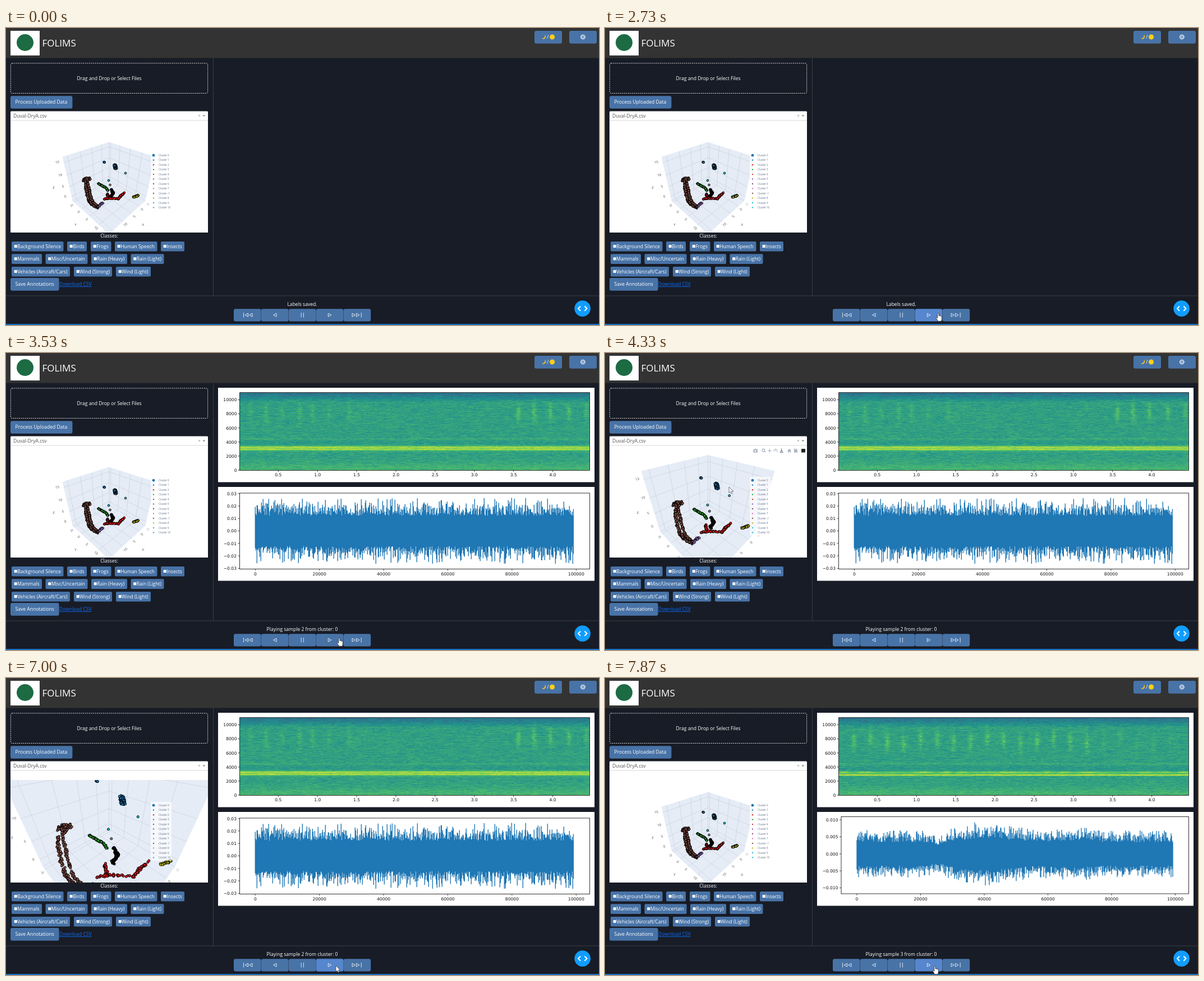
An HTML page with a canvas that plays this animation: 1057x530 px, repeating every 8 s.

```html
<!DOCTYPE html>
<html lang="en">
<head>
<meta charset="utf-8">
<title>Audio annotation dashboard</title>
<style>
  html, body { margin: 0; width: 100%; height: 100%; overflow: hidden; background: #181c26; }
  #stage { position: absolute; left: 0; top: 0; width: 1057px; height: 530px; overflow: hidden; }
  #stage > * { position: absolute; left: 0; top: 0; }
  svg { font: 8.55px "Open Sans", sans-serif; fill: #fff; }
  #scene { left: 8px; top: 166px; }
  .spec { left: 417px !important; top: 71px !important; }
  .tick { font: 7.6px "DejaVu Sans", sans-serif; fill: #111; }
  .legend { font-size: 4.5px; fill: #5f6e88; }
</style>
</head>
<body>
<div id="stage">
  <svg id="base" width="1057" height="530"></svg>
  <canvas id="scene" width="352" height="199"></canvas>
  <canvas class="spec" id="spec2" width="623" height="138"></canvas>
  <canvas class="spec" id="spec3" width="623" height="138"></canvas>
  <svg id="top" width="1057" height="530"></svg>
</div>
<script>
const $ = id => document.getElementById(id);
const BLUE = '#4873a7', HOVER = '#5686cd';

function seeded(s) {
  return () => {
    s = (s + 0x6D2B79F5) | 0;
    let v = Math.imul(s ^ (s >>> 15), 1 | s);
    v = (v + Math.imul(v ^ (v >>> 7), 61 | v)) ^ v;
    return ((v ^ (v >>> 14)) >>> 0) / 4294967296;
  };
}
const smooth = u => u * u * (3 - 2 * u);
const bump = (x, c, w) => Math.exp(-(((x - c) / w) ** 2));

/* ---- markup helpers ---- */
const rect = (x, y, w, h, fill, more = '') =>
  `<rect x="${x}" y="${y}" width="${w}" height="${h}" fill="${fill}" ${more}/>`;
const text = (x, y, s, more = '') => `<text x="${x}" y="${y}" ${more}>${s}</text>`;
const mid = 'text-anchor="middle"';
const line = (d, color = '#fff', w = 0.8) =>
  `<path d="${d}" fill="none" stroke="${color}" stroke-width="${w}"/>`;
const disc = (x, y, r, fill) => `<circle cx="${x}" cy="${y}" r="${r}" fill="${fill}"/>`;
const button = (x, y, w, h, more = '') => rect(x, y, w, h, BLUE, `rx="3" ${more}`);
const left = x => `M${x + 5.5} 509.2V515.2L${x} 512.2Z`;
const right = x => `M${x} 509.2V515.2L${x + 5.5} 512.2Z`;
const bar = x => `M${x} 508V516.5`;

function classRow(y, items) {
  return items.map(([x, w, label]) =>
    rect(x, y, w, 17.6, BLUE, 'rx="2"') + rect(x + 4.7, y + 6, 5, 5, '#fff') +
    text(x + 10.2, y + 11.8, label)).join('');
}

/* ---- right hand plots ---- */
const plots = {
  2: { x0: 444.3, dx: 114.4, y0: 317.5, dy: 22.25, unit: 0.01, count: 3, digits: 2, box: [416.5, 250, 624, 135.5] },
  3: { x0: 449, dx: 113.5, y0: 313.8, dy: 30.35, unit: 0.005, count: 2, digits: 3, box: [421, 247.5, 619.5, 137.5] }
};

function wave(n, p) {
  const rnd = seeded(n * 31), end = p.x0 + p.dx * 4.965;
  const amp = env => {
    const r = rnd();
    return n == 2 ? 27 + 19 * r + 13 * r ** 7 : (23 + 17 * r + 7 * r ** 6) * env;
  };
  let d = '';
  for (let x = p.x0; x < end; x += 1) {
    const env = 0.9 + 0.34 * bump(x, 680, 55) + 0.13 * bump(x, 830, 45) - 0.25 * bump(x, 593, 14);
    d += `M${x.toFixed(1)} ${(p.y0 - amp(env)).toFixed(1)}V${(p.y0 + amp(env)).toFixed(1)}`;
  }
  return line(d, '#1f77b4', 1.35);
}

function plotMarkup(n) {
  const p = plots[n], [bx, by, bw, bh] = p.box;
  let s = rect(378, 62, 671, 168.5, '#fff') + rect(378, 239, 671, 167.5, '#fff');
  s += rect(416.6, 70.6, 623.8, 138.8, 'none', 'stroke="#000" stroke-width=".8"');
  for (let i = 0; i < 6; i++) {
    const y = 209 - i * 25.1;
    s += line(`M413.5 ${y}H417`, '#000', 0.7) + text(411.5, y + 2.8, i * 2000, 'class="tick" text-anchor="end"');
    const x = p.x0 + i * p.dx;
    s += line(`M${x} ${by + bh}v3`, '#000', 0.7) + text(x, 396.8, i * 20000, `class="tick" ${mid}`);
  }
  for (let i = 1; i < 9; i++) {
    const x = 415.4 + i * 69.9;
    s += line(`M${x} 209v3.5`, '#000', 0.7) + text(x, 220.2, (i / 2).toFixed(1), `class="tick" ${mid}`);
  }
  s += wave(n, p) + rect(bx, by, bw, bh, 'none', 'stroke="#000" stroke-width=".8"');
  for (let i = -p.count; i <= p.count; i++) {
    const y = p.y0 - i * p.dy, v = (i * p.unit).toFixed(p.digits).replace('-', '−');
    s += line(`M${bx - 3} ${y}h3`, '#000', 0.7) + text(bx - 5.5, y + 2.8, v, 'class="tick" text-anchor="end"');
  }
  return `<g id="plot${n}">${s}</g>`;
}

const viridis = [[68, 1, 84], [59, 82, 139], [33, 145, 140], [94, 201, 98], [253, 231, 37]];
function shade(v) {
  v = Math.max(0, Math.min(0.999, v)) * 4;
  const i = v | 0, u = v - i;
  return viridis[i].map((c, k) => c + (viridis[i + 1][k] - c) * u);
}

function drawSpectrogram(n) {
  const W = 623, H = 138, ctx = $('spec' + n).getContext('2d');
  const img = ctx.createImageData(W, H), rnd = seeded(n * 977);
  const calls = n == 2
    ? [[913, .16], [941, .16], [970, .16], [1003, .13], [1034, .12], [435, .07], [463, .08], [492, .07],
       [523, .1], [545, .08], [575, .05], [612, .05], [641, .04]]
    : Array.from({ length: 20 }, (_, i) => [443 + i * 29.7, i < 15 ? 0.15 : 0.06]);
  for (let y = 0; y < H; y++) {
    const hz = (H - y - 0.5) / H * 11000;
    const base = 0.565 + 0.09 * bump(hz, 0, 1000) - 0.2 * Math.max(0, (hz - 9600) / 1400)
      - 0.03 * bump(hz, 3800, 350) + 0.05 * bump(hz, 4450, 120);
    let noise = 0;
    for (let x = 0; x < W; x++) {
      if (x % 4 == 0) noise = noise * 0.35 + (rnd() + rnd() - 1) * 0.075;
      let v = base + noise;
      if (n == 2) {
        v += 0.22 * bump(hz, 3110, 330) + 0.15 * (bump(hz, 3290, 110) + bump(hz, 2930, 110));
      } else {
        const dash = 0.75 + 0.25 * Math.sin(x / 9 + 3 * Math.sin(x / 31));
        v += 0.27 * dash * bump(hz, 3250, 120) + 0.33 * bump(hz, 2850, 110) + 0.1 * bump(hz, 3050, 200);
      }
      for (const [cx, a] of calls) {
        const dx = x + 417 - cx;
        if (Math.abs(dx) < 14)
          v += a * bump(dx, 0, 4) * bump(hz, n == 2 ? 8200 : 7700 + 500 * Math.sin(cx), 1250) * (0.8 + 5 * noise);
      }
      const o = (y * W + x) * 4, c = shade(v);
      img.data[o] = c[0]; img.data[o + 1] = c[1]; img.data[o + 2] = c[2]; img.data[o + 3] = 255;
    }
  }
  ctx.putImageData(img, 0, 0);
}

/* ---- 3D scatter: camera at distance d along (1,1,1) ---- */
const FAR = 2.165, NEAR = 1.07, CX = 183.5, CY = 274, FOCAL = 222, HZ = 0.46;
const project = (x, y, z, d) => {
  const k = FOCAL / (d - (x + y + z) / Math.sqrt(3));
  return [CX + (y - x) / Math.SQRT2 * k, CY - (2 * z - x - y) / Math.sqrt(6) * k];
};

// colour, count, spread x, spread y, depth, path of far-view positions
const clusters = [
  ['#17becf', 1, 0, 0, -0.38, [[213, 259]]],
  ['#2ca02c', 60, 0.6, 0.6, -0.2, [[164, 277], [172, 282], [178, 285], [181.5, 290]]],
  ['#17becf', 1, 0, 0, 0, [[183, 272]]],
  ['#050505', 90, 1.2, 1, 0.02, [[187.5, 288], [191, 294.5], [186.5, 301.5]]],
  ['#7f7f7f', 1, 0, 0, 0.1, [[185.5, 280]]],
  ['#1f77b4', 90, 1.6, 2.4, 0.086, [[194, 245.5], [195.8, 249]]],
  ['#bcbd22', 30, 0.9, 0.7, 0.086, [[227, 302], [231, 300.5], [235.5, 299]]],
  ['#8c564b', 95, 1.5, 1.8, -0.03, [[138, 272], [143, 269], [149, 269], [142, 275]]],
  ['#8c564b', 120, 1.4, 1, 0.16, [[141.5, 277], [144, 294], [148, 308], [152, 314], [163, 321]]],
  ['#8c564b', 90, 1, 1, 0.16, [[146, 277], [149.5, 295], [155, 311], [165, 320]]],
  ['#9467bd', 14, 1.2, 1.2, 0.3, [[165, 318], [172, 312]]],
  ['#e8171c', 35, 0.9, 0.9, 0.39, [[180.5, 296.5], [182.5, 304]]],
  ['#e8171c', 85, 0.8, 0.8, 0.39, [[175, 305.5], [184, 303.5], [200, 305], [204, 300], [210.5, 294.5]]],
  ['#1f77b4', 7, 0.3, 0.3, 0.39, [[173.8, 238.4], [176.4, 240.4]]]
];
const rnd = seeded(42), spread = s => (rnd() + rnd() - 1) * 1.35 * s;
const points = clusters.flatMap(([color, n, sx, sy, depth, path]) =>
  Array.from({ length: n }, () => {
    const u = rnd() * (path.length - 1), i = Math.min(u | 0, Math.max(0, path.length - 2));
    const a = path[i], b = path[i + 1] || a;
    return { color, depth, x: a[0] + (b[0] - a[0]) * (u - i) + spread(sx), y: a[1] + (b[1] - a[1]) * (u - i) + spread(sy) };
  }));

const scene = $('scene').getContext('2d');
function drawScene(d) {
  const c = scene, at = (x, y, z) => project(x, y, z, d);
  const trace = (...p) => { c.beginPath(); p.forEach(q => c.lineTo(...q)); };
  const label = (s, [x, y], dx, dy, turn) => {
    c.save(); c.translate(x + dx, y + dy); c.rotate(turn); c.fillText(s, 0, 0); c.restore();
  };
  c.setTransform(1, 0, 0, 1, 0, 0);
  c.fillStyle = '#fff'; c.fillRect(0, 0, 352, 199);
  c.translate(-8, -166);
  c.save();
  c.beginPath(); c.rect(8, 182, 352, 183); c.clip();
  const A = at(-.5, -.5, HZ), B = at(-.5, -.5, -HZ), L = at(.5, -.5, HZ), l = at(.5, -.5, -HZ);
  const R = at(-.5, .5, HZ), r = at(-.5, .5, -HZ), F = at(.5, .5, -HZ);
  c.fillStyle = c.strokeStyle = '#e5ecf6'; c.lineWidth = 0.5;
  for (const face of [[A, L, l, B], [A, R, r, B], [B, l, F, r]]) { trace(...face); c.closePath(); c.fill(); c.stroke(); }
  c.strokeStyle = '#c3cbd7'; c.lineWidth = 0.6;
  const ticks = [0, 1, 2, 3];
  for (const i of ticks) {
    const x = -0.3 + i * 0.24, y = -0.45 + i * 0.24, z = -0.353 + i * 0.24;
    trace(at(x, -.5, HZ), at(x, -.5, -HZ), at(x, .5, -HZ)); c.stroke();
    trace(at(-.5, y, HZ), at(-.5, y, -HZ), at(.5, y, -HZ)); c.stroke();
    trace(at(.5, -.5, z), at(-.5, -.5, z), at(-.5, .5, z)); c.stroke();
  }
  trace(A, B, l); c.stroke(); trace(B, r); c.stroke();
  c.fillStyle = '#444'; c.font = '6px "Open Sans", sans-serif';
  c.textAlign = 'center'; c.textBaseline = 'middle';
  for (const i of ticks) {
    label(i * 5, at(.5, -.5, -0.353 + i * 0.24), -11.5, 0, -0.25);
    label(i * 5 - 5, at(.5, -0.45 + i * 0.24, -HZ), -5, 6, 0.75);
    if (i < 3) label(i * 5, at(-0.3 + i * 0.24, .5, -HZ), 5, 6, -0.75);
  }
  c.fillStyle = '#999'; label(-5, at(-.5, .5, -HZ), 5, 7, -0.75); c.fillStyle = '#444';
  label('Z', at(.5, -.5, 0), -26, 11, 0);
  label('Y', at(.5, 0, -HZ), -23, 17, 0);
  label('X', at(0, .5, -HZ), 24, 17, 0);
  c.strokeStyle = '#000'; c.lineWidth = 0.9;
  const size = 1.85 + 0.25 * (FAR - d) / (FAR - NEAR);
  for (const p of points) {
    const k = (FAR - p.depth) / (d - p.depth);
    c.beginPath();
    c.arc(CX + (p.x - CX) * k, CY + (p.y - CY) * k, size, 0, 7);
    c.fillStyle = p.color; c.fill(); c.stroke();
  }
  c.restore();
}

/* ---- static page ---- */
$('base').innerHTML =
  rect(0, 0, 1057, 530, '#181c26') + rect(0, 0, 1057, 53.5, '#333') +
  rect(8, 5, 52, 44, '#fff') + disc(34, 26, 15, '#1d6b43') +
  text(64.5, 33, 'FOLIMS', 'font-size="17"') +
  button(942, 5, 49, 22.7) + button(1004, 5, 49, 22.7) +
  '<path d="M960.6 11.6A4.6 4.6 0 1 1 954.6 18.6A5.4 5.4 0 0 0 960.6 11.6Z" fill="#fcc21b"/>' +
  text(964.3, 19.2, '/') + disc(973.6, 16, 4.5, '#fdd017') +
  '<circle cx="1028.3" cy="16" r="3.8" fill="none" stroke="#fff" stroke-width="1.3" stroke-dasharray="1.5 .89"/>' +
  '<circle cx="1028.3" cy="16" r="2.9" fill="none" stroke="#fff" stroke-width=".9"/>' + disc(1028.3, 16, 1, '#fff') +
  rect(369, 53.5, 0.8, 424, '#41454c') + rect(0, 477.5, 1057, 0.8, '#41454c') +
  rect(8.4, 62.9, 351.2, 53.6, 'none', 'rx="2.5" stroke="#fff" stroke-width=".8" stroke-dasharray="2.2 1.4"') +
  text(184, 93.4, 'Drag and Drop or Select Files', mid) +
  button(8, 121.3, 110.4, 22.5) + text(16.5, 135.3, 'Process Uploaded Data') +
  rect(8, 148.6, 352, 216.4, '#fff', 'rx="1.5"') + rect(8, 164.6, 352, 0.8, '#ccc') +
  text(13, 159.8, 'Duval-DryA.csv', 'fill="#555"') + text(344.5, 159.3, '×', `${mid} fill="#888" font-size="8"`) +
  '<path d="M350.3 155.5H355.3L352.8 158.2Z" fill="#888"/>' +
  text(184, 374.2, 'Classes:', mid) +
  classRow(381, [[10, 92.5, 'Background Silence'], [109, 35, 'Birds'], [151, 36.5, 'Frogs'], [194, 75.5, 'Human Speech'], [276, 42, 'Insects']]) +
  classRow(403.3, [[10, 54, 'Mammals'], [70.5, 75, 'Misc/Uncertain'], [152, 64, 'Rain (Heavy)'], [222.5, 59, 'Rain (Light)']]) +
  classRow(426, [[10, 104, 'Vehicles (Aircraft/Cars)'], [121, 68, 'Wind (Strong)'], [196, 62, 'Wind (Light)']]) +
  button(8, 446, 86.5, 22.7) + text(16.5, 460.2, 'Save Annotations') +
  text(94.8, 460.2, 'Download CSV', 'fill="#0d6efd" text-decoration="underline"') +
  plotMarkup(2) + plotMarkup(3) +
  text(528, 496.4, '', `${mid} id="status"`) +
  [406, 455, 504, 552.8, 601.6].map((x, i) => button(x, 501.2, 48.6, 22.4, i == 3 ? 'id="play"' : '')).join('') +
  line(bar(423.5) + left(426) + left(433.5) + left(476.5) + bar(526.2) + bar(530.4) + right(574.3) +
    right(617) + right(624.5) + bar(633.2)) +
  rect(0, 528, 1057, 2, '#1670c4');

const legend = [['0', '#1f77b4'], ['1', '#1f77b4'], ['2', '#e8171c'], ['3', '#2ca02c'], ['4', '#d62728'], ['5', '#9467bd'],
  ['6', '#8c4a6b'], ['7', '#e377c2'], ['-1', '#8c564b'], ['8', '#bcbd22'], ['9', '#17becf'], ['10', '#17becf']];
$('top').innerHTML =
  rect(258, 221, 37, 105, '#fff', 'fill-opacity=".65"') +
  legend.map(([n, color], i) =>
    disc(263, 227.2 + i * 8.47, i ? 1.2 : 2.4, color) +
    text(272, 228.8 + i * 8.47, 'Cluster ' + n, 'class="legend"')).join('') +
  '<g id="tools" stroke-linejoin="round">' +
    '<path d="M264.5 172H266.5L267.3 170.8H269.3L270 172H272V177.5H264.5ZM337 172.5H343V177.5H337ZM336 171H342V172H336Z" fill="#a9b2c0"/>' +
    disc(268.2, 174.5, 1.5, '#fff') +
    line('M284.6 175.4L286.4 177.4M280 173.6a2.5 2.5 0 1 0 5 0a2.5 2.5 0 1 0 -5 0', '#a9b2c0', 1.2) +
    line('M290 174.3H297M293.5 170.8V177.8M301.5 176a3 3 0 1 1 4 1M305 171.5L303 175', '#a9b2c0', 1) +
    line('M314.5 170.5V176M311.5 177.5H317.8M312.5 176L314.5 174.5L316.7 176', '#69738a', 1.1) +
    '<path d="M325 174.5L328.5 171L332 174.5H331V177.8H329.3V175.5H327.7V177.8H326V174.5Z" fill="#a9b2c0"/>' +
    rect(350, 171, 7, 6.5, '#222') +
  '</g>' +
  '<g id="loading">' + rect(0, 0, 1057, 528, '#181c26') + rect(0, 0, 1057, 0.9, '#383c43') +
    [0, 1, 2, 3, 4].map(i => rect(517.2 + i * 4.3, 262, 3, 18, '#119dff', 'class="bar"')).join('') + '</g>' +
  disc(1027.6, 500.6, 14.3, '#119dff') +
  line('M1024 496.5L1020 500.6L1024 504.7M1031.4 496.5L1035.4 500.6L1031.4 504.7', '#fff', 2) +
  '<path id="arrow" d="M0 0V10.6L2.4 8.4L4.1 12L5.8 11.2L4.2 7.7H7.6Z" stroke="#222" stroke-width=".6"/>' +
  '<path id="hand" d="M-1.2 1.2Q0 -.6 1 1.2V5.4Q2.4 4.6 3 5.8Q4.3 5.2 4.8 6.3Q6.4 6 6.4 7.6V11Q6.2 13 5.2 15.2H-.6Q-1.6 12.6 -4 9.6Q-4.2 7.8 -2.4 8.5L-1.2 9.8Z" stroke="#111" stroke-width=".7"/>';

drawSpectrogram(2);
drawSpectrogram(3);

/* ---- timeline ---- */
const path = [[133, 1057, 530], [600, 775, 389], [733, 775, 389], [1600, 657, 353], [2470, 594, 508], [3533, 594, 508],
  [4130, 221, 239], [5003, 221, 239], [5740, 588, 517], [5870, 588, 513.5], [8000, 588, 513.5]];
const zoom = [[4130, FAR], [4400, 1.4], [4600, 1.2], [4866, NEAR], [7066, NEAR], [7067, FAR]];

function sample(keys, t, ease) {
  if (t <= keys[0][0]) return keys[0].slice(1);
  for (let i = 1; i < keys.length; i++) {
    const a = keys[i - 1], b = keys[i];
    if (t <= b[0]) {
      const u = ease((t - a[0]) / (b[0] - a[0]));
      return a.slice(1).map((v, k) => v + (b[k + 1] - v) * u);
    }
  }
  return keys[keys.length - 1].slice(1);
}
const show = (id, on) => { $(id).style.display = on ? '' : 'none'; };
const bars = [...document.querySelectorAll('.bar')];
// start, end, start of the bar animation
const LOADS = [[2860, 3530, 2860], [7060, 7730, 7260]];
let lastZoom, lastStep;

function render(step) {
  const t = step * 1000 / 15 + 1;
  const load = LOADS.find(([a, b]) => t >= a && t < b);
  const n = t < 3530 ? 0 : t < 7730 ? 2 : 3;
  for (const k of [2, 3]) { show('plot' + k, n == k); show('spec' + k, n == k && !load); }
  $('status').textContent = n ? `Playing sample ${n} from cluster: 0` : 'Labels saved.';

  const [x, y] = sample(path, t, smooth);
  const over = x > 553 && x < 601 && y > 501 && y < 523;
  const settling = (t > 3530 && t < 3600) || (t > 7730 && t < 7800);
  const pressed = t > 6930 && t < 7730;
  $('play').setAttribute('fill', over && !settling ? HOVER : BLUE);
  $('play').setAttribute('stroke', pressed ? '#416aa8' : 'none');
  const hand = over && !load && !pressed;
  show('arrow', t > 200 && !hand);
  show('hand', hand);
  $('arrow').setAttribute('transform', `translate(${x} ${y})`);
  $('hand').setAttribute('transform', `translate(${x} ${y})`);
  show('tools', x > 8 && x < 360 && y > 165 && y < 365);

  const [d] = sample(zoom, t, u => u);
  if (d !== lastZoom) drawScene(lastZoom = d);

  show('loading', !!load);
  if (load) bars.forEach((b, i) => {
    const p = ((t - load[2] - i * 100 + 2400) % 1200) / 240;
    const h = 18 * (0.4 + 0.6 * (p < 2 ? smooth(1 - Math.abs(p - 1)) : 0));
    b.setAttribute('height', h);
    b.setAttribute('y', 271 - h / 2);
  });
}

const start = performance.now();
function tick() {
  // 15 steps per second; the small offset absorbs rounding of the clock
  const step = Math.floor(((performance.now() - start) % 8000) * 0.015 + 0.08) % 120;
  if (step !== lastStep) render(lastStep = step);
  requestAnimationFrame(tick);
}
tick();
</script>
</body>
</html>
```
